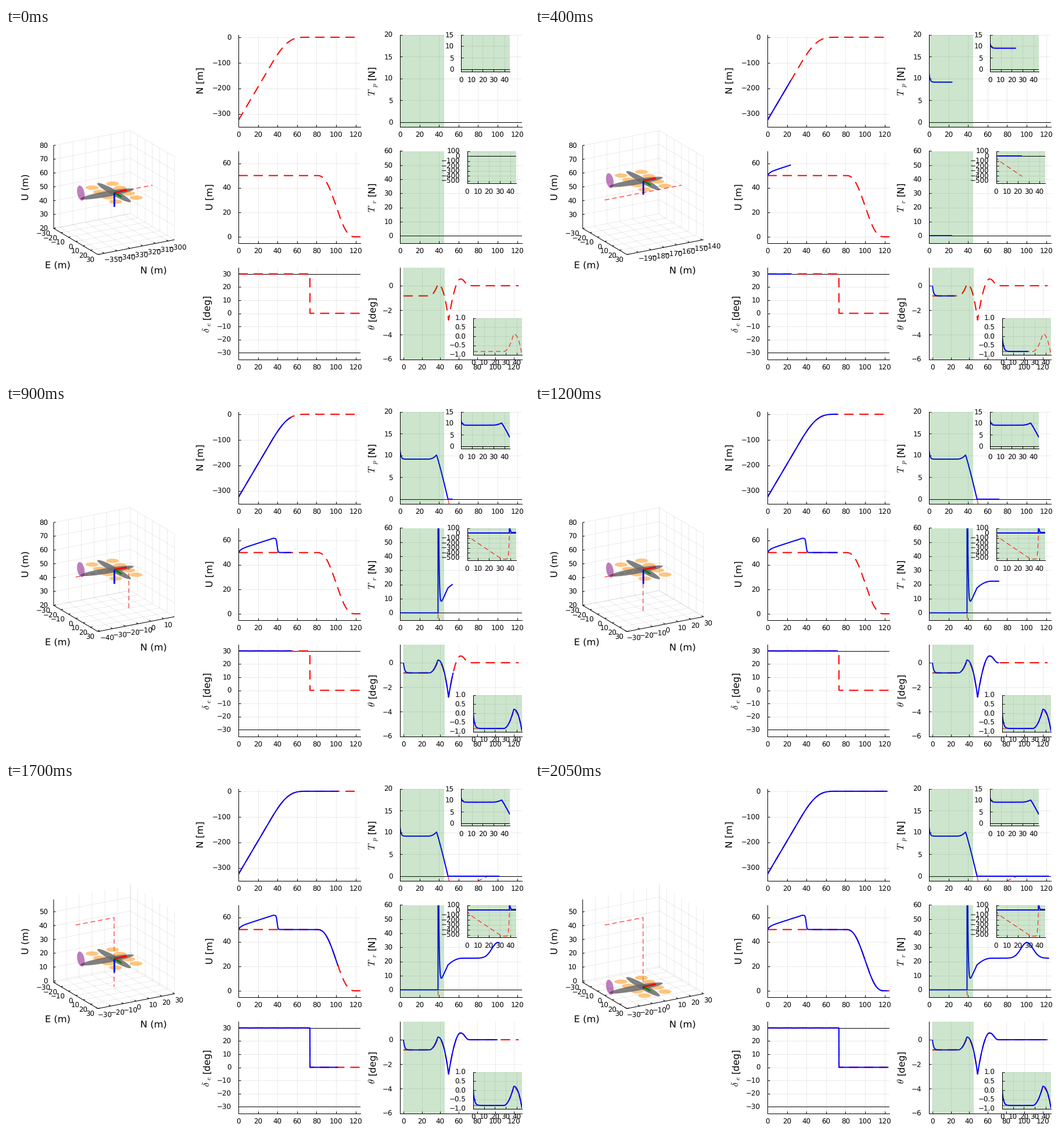
Recreate the animation shown at these times as a matplotlib script. Size 900 by 600 pixels, loop 3.1 s.

```python
import matplotlib.pyplot as plt
import numpy as np
from matplotlib.animation import FuncAnimation
from matplotlib.patches import Polygon

W, H, PX = 900, 600, 0.72          # stage in pixels, points per pixel
TICK, GUIDE, SUB = 8.53, 11.73, 8.5
STEP, LAST, FRAMES = 3, 41, 62     # seconds per frame, last moving frame
DASH = (0, (8, 5))

plt.rcParams.update({
    "font.family": "DejaVu Sans",
    "mathtext.fontset": "cm",
    "text.hinting": "none",
    "axes.axisbelow": True,
    "axes.linewidth": PX,
    "lines.solid_capstyle": "butt",
})


# ---------- signals over time in seconds ----------

def part(t, a, b):
    return np.clip((t - a) / (b - a), 0, 1)


def ease(t, a, b):
    s = part(t, a, b)
    return s**3 * (10 - 15 * s + 6 * s * s)


def north(t):
    s = part(t, 28, 72)
    braking = 44 * (s - 2.5 * s**4 + 3 * s**5 - s**6)
    return -325 + 6.5 * (np.minimum(t, 28) + braking)


def up_ref(t):
    return 50 * (1 - ease(t, 80, 120))


def up(t):
    drift = 0.26 * np.minimum(t, 35.5) + 2.4 * (1 - np.exp(-t / 2.2))
    return up_ref(t) + drift / (1 + np.exp(np.clip((t - 39.6) / 0.45, -50, 50)))


def elevator(t):
    return np.where(t < 73.25, 30.0, 0.0)


def pitch_ref(t, peak=0.13):
    rise = -0.83 + (peak + 0.83) * part(t, 28, 37.4) ** 2
    fall = peak - (peak + 2.8) * part(t, 37.4, 49) ** 2.2
    back = 0.55 - 3.35 * (1 - part(t, 49, 61.7)) ** 1.8 - 0.55 * ease(t, 61.7, 72)
    return np.where(t < 37.4, rise, np.where(t < 49, fall, back))


def pitch(t):
    return pitch_ref(t, 0.22) + 0.83 * np.exp(-t / 1.2)


def pusher_raw(t):
    rise = 9.15 + 2.1 * np.exp(-t) + 0.95 * part(t, 28, 37.4) ** 2.5
    fall = 10.1 * (1 - (np.maximum(t - 37.4, 0) / 11.8) ** 1.1)
    regain = np.minimum((t - 90) / 9.6, 0)
    return np.where(t < 37.4, rise, np.maximum(fall, regain))


def pusher(t):
    return np.maximum(pusher_raw(t), 0)


def rotor(t):
    late = np.maximum(t, 39)
    spike = 17.5 - 1.55 * (49 - late) + 130 * np.exp((39.2 - late) / 0.65)
    hover = 22.4 - 4.9 * (1 - part(t, 49, 64)) ** 2
    descent = 11.1 * np.exp(-0.5 * ((t - 100.3) / 6.2) ** 2)
    return np.where(t < 39, 0, np.where(t < 49, spike, hover + descent))


def rotor_raw(t):
    sink = np.maximum(-14.6 * t - 60 * (1 - np.exp(-t)), -528)
    return np.where(t < 39, sink * (1 - part(t, 34, 39) ** 8), rotor(t))


# ---------- plots ----------

T = np.arange(0, 125.01, 0.05)
fig = plt.figure(figsize=(W / 100, H / 100), dpi=100, facecolor="white")
live = []   # (line, values) that grow with time


def minus(s):
    return s.replace("-", "\u2212")


def panel(x, y, w, h, xlim, ylim, xstep, ystep, fmt="{:.0f}"):
    ax = fig.add_axes([x / W, 1 - (y + h) / H, w / W, h / H])
    ax.set(xlim=xlim, ylim=ylim)
    ax.set_xticks(np.arange(0, xlim[1] + 0.1, xstep))
    first = np.ceil(ylim[0] / ystep) * ystep
    marks = np.arange(first, ylim[1] + 1e-6, ystep)
    ax.set_yticks(marks, [minus(fmt.format(v + 0.0)) for v in marks])
    ax.tick_params(direction="in", length=3, width=PX, labelsize=TICK)
    ax.tick_params(axis="x", pad=6.7)
    ax.tick_params(axis="y", pad=9)
    ax.grid(color="black", alpha=0.1, lw=0.55)
    for side in ("top", "right"):
        ax.spines[side].set_visible(False)
    for spine in ax.spines.values():
        spine.set_zorder(6)
    return ax


def big(col, row, ylim, ystep, xlim=(0, 125)):
    return panel(400 + 278 * col, 11.5 + 200 * row, 210, 158,
                 xlim, ylim, 20, ystep)


def inset(x, y, h, ylim, ystep, fmt="{:.0f}"):
    ax = panel(x, y, 84, h, (0, 45), ylim, 10, ystep, fmt)
    shade(ax, 0.6)
    return ax


def level(ax, *values):
    for v in values:
        ax.axhline(v, color="black", lw=PX, zorder=2)


def shade(ax, z=5):
    ax.axvspan(0, 45, facecolor="green", alpha=0.2, lw=0, zorder=z)


def dashed(ax, f, width, grows=False):
    line, = ax.plot(T, f(T), color="red", lw=width * PX, ls=DASH, zorder=3)
    if grows:
        live.append((line, f(T)))


def trace(ax, f):
    line, = ax.plot([], [], color="blue", lw=2 * PX, zorder=4)
    live.append((line, f(T)))


def side_text(x, y, s, size=GUIDE):
    fig.text(x / W, 1 - y / H, s, fontsize=size, rotation=90,
             rotation_mode="anchor", ha="center", va="baseline")


# middle column
for row, f, ref, ylim, ystep in ((0, north, north, (-350, 10), 100),
                                 (1, up, up_ref, (-5, 70), 20),
                                 (2, elevator, elevator, (-35, 35), 10)):
    ax = big(0, row, ylim, ystep)
    if f is elevator:
        level(ax, -30, 30)
    dashed(ax, ref, 2)
    trace(ax, f)

# thrusts, each with its inset
for f, raw, axes in (
        (pusher, pusher_raw, (big(1, 0, (-1, 20), 5),
                              inset(783, 11.5, 63.5, (-1, 15), 5))),
        (rotor, rotor_raw, (big(1, 1, (-5, 60), 10),
                            inset(793.5, 211.5, 55.5, (-550, 100), 100)))):
    shade(axes[0])
    for ax in axes:
        level(ax, 0)
        dashed(ax, raw, 1, True)
        trace(ax, f)

# pitch
ax = big(1, 2, (-6, 1.5), 2, (-3.75, 128.75))
shade(ax)
dashed(ax, pitch_ref, 2)
trace(ax, pitch)
ax = inset(804, 498.5, 63, (-1, 1), 0.5, "{:.1f}")
dashed(ax, pitch_ref, 1)
trace(ax, pitch)

side_text(340, 90, "N [m]")
side_text(356, 290, "U [m]")
side_text(350, 479, "[deg]")
side_text(350, 519, r"$\delta$")
side_text(353, 509, r"$e$", SUB)
for y, sub in ((77, "$p$"), (277, "$r$")):
    side_text(635, y, "[N]")
    side_text(635, y + 33, "$T$")
    side_text(638, y + 21, sub, SUB)
side_text(635, 482, "[deg]")
side_text(635, 514, r"$\theta$")

# ---------- 3D view ----------

view = fig.add_axes([0, 0, 1, 1], zorder=-1)
view.set(xlim=(0, W), ylim=(H, 0))
view.axis("off")
side_text(38.5, 273, "U (m)")
for x, y, s in ((89, 412.5, "E (m)"), (254, 422, "N (m)")):
    view.text(x, y, s, fontsize=GUIDE, ha="center", va="baseline")

ANG = np.linspace(0, 2 * np.pi, 60)
COS, SIN = np.cos(ANG), np.sin(ANG)
scene = []


def project(n, e, u):
    """Offsets north and east of the box centre, height over its floor."""
    return 186 + 2.2 * n + 1.267 * e, 354.25 - 0.425 * n + 0.75 * e - 2.375 * u


def stroke(*pts, **style):
    line, = view.plot(*zip(*(project(*p) for p in pts)), **style)
    scene.append(line)


def grid(*pts):
    stroke(*pts, color="black", alpha=0.1, lw=0.55, zorder=1)


def axis(*pts):
    stroke(*pts, color="black", lw=PX, zorder=2)


def label(p, value, dx, dy, ha):
    x, y = project(*p)
    scene.append(view.text(x + dx, y + dy, minus(str(int(value))),
                           fontsize=TICK, ha=ha, va="center_baseline",
                           zorder=3))


def tens(lo, hi):
    return np.arange(np.ceil(lo / 10 - 1e-6), np.floor(hi / 10 + 1e-6) + 1) * 10


def draw_box(nc, floor):
    for v in tens(nc - 30, nc + 30):
        n = v - nc
        grid((n, 30, 0), (n, -30, 0), (n, -30, 60))
        axis((n, 30, 0), (n, 27.5, 0))
        label((n, 30, 0), v, 0, 11, "left")
    for e in tens(-30, 30):
        grid((-30, e, 0), (30, e, 0), (30, e, 60))
        axis((-30, e, 0), (-28.5, e, 0))
        label((-30, e, 0), e, -5.5, 9, "right")
    for v in tens(floor, floor + 60):
        u = v - floor
        grid((-30, -30, u), (30, -30, u), (30, 30, u))
        axis((-30, -30, u), (-28.5, -30, u))
        label((-30, -30, u), v, -10, 0, "right")
    axis((-30, -30, 60), (-30, -30, 0), (-30, 30, 0), (30, 30, 0))


def draw_path(nc, floor):
    a, b = max(-325 - nc, -30), min(-nc, 30)
    pts = [(a, 0, 50 - floor), (b, 0, 50 - floor)]
    if -nc <= 30:
        pts.append((-nc, 0, max(0, floor) - floor))
    stroke(*pts, color="red", lw=PX, ls=DASH, zorder=4)


def draw_craft(u, slope):
    def disc(n, e, z, color, alpha, order):
        xy = np.column_stack(project(n, e, u + z + n * slope))
        scene.append(view.add_patch(Polygon(xy, facecolor=color, alpha=alpha,
                                            lw=0, zorder=order)))

    def arm(n, e, z, color):
        stroke((0, 0, u), (n, e, max(u + z + n * slope, 0)), color=color,
               lw=3 * PX, zorder=8)

    for n in (-8, 8):
        for e in (-16, -6, 6, 16):
            disc(n + 4.33 * COS, e + 4.33 * SIN, 0, "darkorange", 0.5, 5)
    disc(-5.5 + 20.7 * COS, 5 * SIN, 0, "#6a6a6a", 0.85, 6)
    disc(3.5 * COS, 22 * SIN, 0, "#6a6a6a", 0.85, 6)
    disc(-26, 5.2 * COS, 4.3 + 5.2 * SIN, "purple", 0.5, 7)
    arm(10, 0, 0, "red")
    arm(0, 10, 0, "green")
    arm(0, 0, -10, "blue")


def draw(frame):
    t = float(STEP * min(frame, LAST))
    shown = T <= t + 1e-6
    for line, values in live:
        line.set_data(T[shown], values[shown])

    while scene:
        scene.pop().remove()
    nc = float(north(t))
    floor = max(float(up_ref(t)) - 30, -1)
    if 0 < t < 48:
        floor += 0.01   # lowest tick slips out of the box
    draw_box(nc, floor)
    draw_path(nc, floor)
    draw_craft(float(up(t)) - floor, np.tan(np.radians(float(pitch(t)))))
    return []


# only the traces and growing dashes follow the frame number
anim = FuncAnimation(fig, draw, frames=FRAMES, interval=50, repeat=True,
                     repeat_delay=0, init_func=lambda: draw(0))
plt.show()
```
